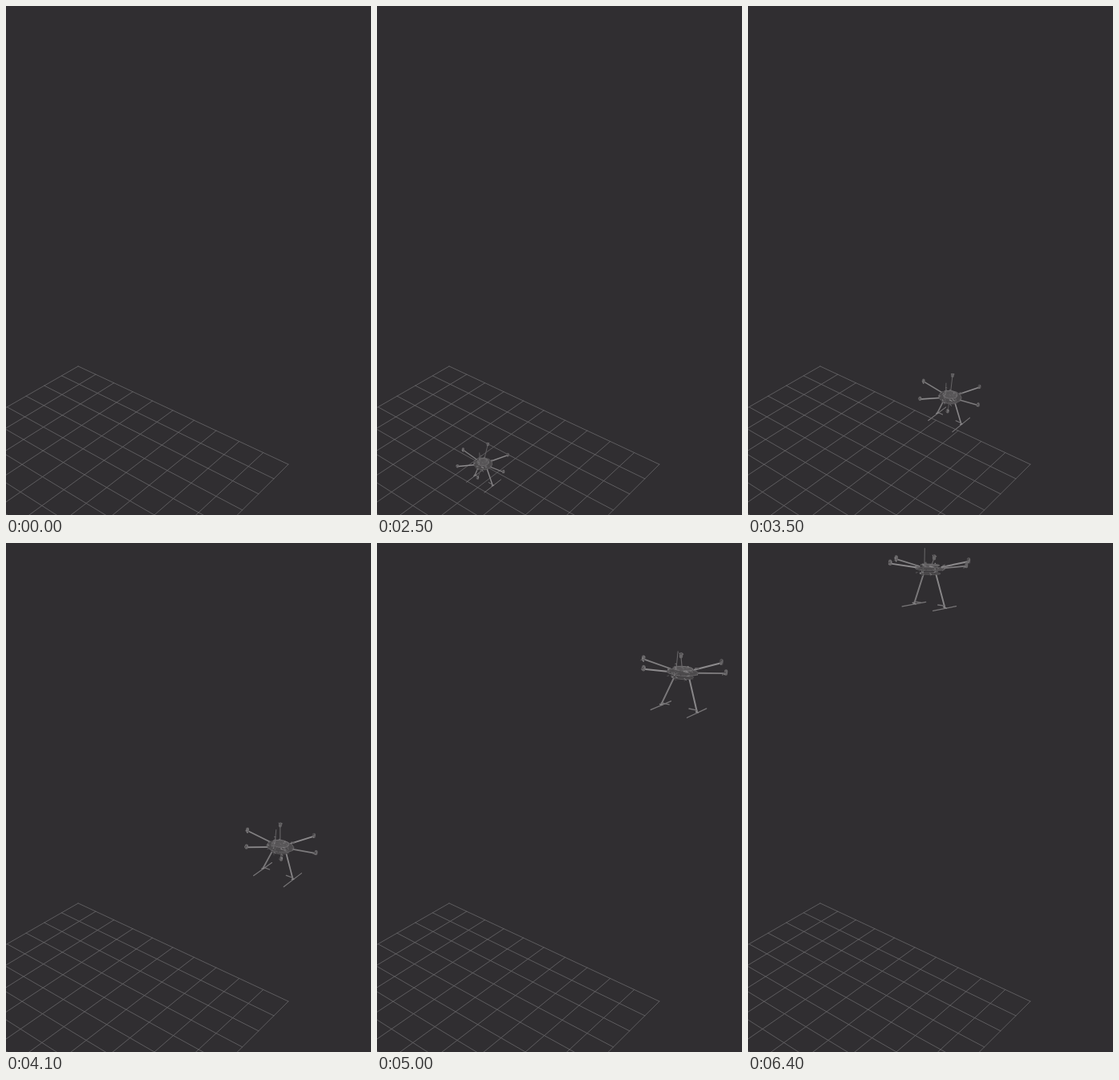
An HTML page for the animation above (7.05 s loop, 455 by 633 pixels).

```html
<!DOCTYPE html>
<html lang="en">
<head>
<meta charset="utf-8">
<title>Hexacopter take-off</title>
<style>
html, body { margin: 0; width: 100%; height: 100%; overflow: hidden; background: #302e31; }
svg { display: block; width: 455px; height: 633px; }
</style>
</head>
<body>
<svg viewBox="0 0 455 633" fill="none" stroke-linecap="round" stroke-linejoin="round">
  <path id="grid" stroke="#69676a" stroke-width=".8"/>
  <g id="drone"></g>
</svg>
<script>
const LOOP = 7050, START = 1350, STEP = 50, RADIUS = 0.85;
const drone = document.getElementById('drone');

// Fixed camera: u and v run along the floor in cells, z points up
const depth = (u, v, z) => 1 - 0.01806 * u - 0.0222 * v - 0.0158 * z;
function project(u, v, z) {
  const w = depth(u, v, z);
  const x = (90 + 19.84 * u - 22.2 * v - 3 * z) / w;
  const y = (448 + 1.906 * u + 1.6 * v - 31.9 * z) / w;
  return x.toFixed(2) + ',' + y.toFixed(2);
}

let floor = '';
for (let i = 0; i <= 10; i++) {
  floor += `M${project(i, 0, 0)}L${project(i, 10, 0)}M${project(0, i, 0)}L${project(10, i, 0)}`;
}
document.getElementById('grid').setAttribute('d', floor);

// Flight in a nearly upright plane: time, u, z
const flight = [
  [1350, 5.06, 0.14], [2500, 6.355, 1.386], [3500, 10.05, 5.732], [4100, 11.974, 9.018],
  [5000, 12.409, 12.971], [5600, 10.97, 14.274], [5800, 10.39, 14.464], [6400, 9.577, 14.576]
];

function slope(i, c) {
  if (i === 0 || i === flight.length - 1) return 0;
  const [p, k, n] = flight.slice(i - 1, i + 2);
  const h0 = k[0] - p[0], h1 = n[0] - k[0];
  return ((k[c] - p[c]) / h0 * h1 + (n[c] - k[c]) / h1 * h0) / (h0 + h1);
}

// Smooth curve through the flight points
function along(t, c) {
  const last = flight.length - 1;
  if (t >= flight[last][0]) return flight[last][c];
  let i = 0;
  while (t >= flight[i + 1][0]) i++;
  const a = flight[i], b = flight[i + 1], h = b[0] - a[0], s = (t - a[0]) / h, q = 1 - s;
  return a[c] * (1 + 2 * s) * q * q + b[c] * s * s * (3 - 2 * s) +
    h * s * q * (slope(i, c) * q - slope(i + 1, c) * s);
}

let seed = 11;
function rnd() {
  seed = (seed * 16807) % 2147483647;
  return seed / 2147483647;
}
function gray(g) {
  return `rgb(${g},${g - 2},${g})`;
}

// Model points in rotor radii: polar in the rotor plane, drop downwards
function pt(r, deg, drop) {
  const a = deg * Math.PI / 180;
  return [r * Math.cos(a), -r * Math.sin(a), drop];
}
function shift([x, y, z], r, deg, drop = 0) {
  const d = pt(r, deg, drop);
  return [x + d[0], y + d[1], z + drop];
}

const parts = [];
function add(pts, g, width, fill) {
  const el = document.createElementNS('http://www.w3.org/2000/svg', 'path');
  el.setAttribute('stroke', gray(g));
  if (fill) el.setAttribute('fill', gray(fill));
  drone.appendChild(el);
  parts.push({ el, pts, width, end: fill ? 'Z' : '' });
}

// Short random strokes that read as machine parts
function addClutter(count, center, spread, height, length) {
  for (let i = 0; i < count; i++) {
    const p = shift(center, spread * Math.sqrt(rnd()), 360 * rnd(), height * (rnd() - 0.5));
    add([p, shift(p, length * rnd(), 360 * rnd(), 0.03 * rnd())],
      Math.round(62 + 76 * rnd()), 0.8 + 0.9 * rnd());
  }
}

function addArm(deg, g, width) {
  const m = pt(1, deg, 0);
  add([pt(0.3, deg, 0.13), pt(0.95, deg, 0.03)], g, width);
  add([shift(m, 0, 0, -0.025), shift(m, 0, 0, 0.03)], 102, 4.4);
  addClutter(5, m, 0.05, 0.1, 0.05);
}

function addPlate(r, drop, edge, fill) {
  const rim = [];
  for (let a = 0; a < 360; a += 30) rim.push(pt(r, a, drop));
  add(rim, edge, 1, fill);
}

function addLeg(deg, g) {
  const foot = pt(0.45, deg, 1);
  add([pt(0.18, deg, 0.28), shift(foot, 0, 0, -0.02)], g, 2);
  add([shift(foot, 0.48, 90), shift(foot, 0.48, 270)], 120, 1.3);
  add([shift(foot, 0, 0, -0.06), shift(foot, 0.2, deg + 180, -0.06)], 118, 1.4);
  add([shift(foot, 0.06, 90), shift(foot, 0.06, 270, -0.04)], 134, 1.6);
}

addArm(120, 104, 1.2);
addArm(180, 130, 1.8);
addArm(60, 140, 2);
addLeg(180, 122);
addLeg(0, 136);
addArm(300, 86, 1.4);
addPlate(0.25, 0.26, 88, 70);
addArm(240, 142, 2);
addArm(0, 124, 1.8);
addPlate(0.35, 0.16, 104, 76);
addPlate(0.22, 0.08, 118, 88);
addClutter(50, pt(0, 0, 0.16), 0.36, 0.24, 0.09);
add([pt(0.16, 180, -0.27), pt(0.16, 180, 0.12)], 114, 0.9);

function render(ms) {
  const t = Math.floor((ms % LOOP) / STEP) * STEP;
  drone.style.display = t < START ? 'none' : '';
  if (t < START) return;
  const u = along(t, 1), z = along(t, 2), v = 5 + 0.06 * z;
  const scale = 0.3 + 0.31 / depth(u, v, z);
  for (const { el, pts, width, end } of parts) {
    const d = pts.map(p => project(u + p[0] * RADIUS, v + p[1] * RADIUS, z - p[2] * RADIUS));
    el.setAttribute('d', 'M' + d.join('L') + end);
    el.setAttribute('stroke-width', (width * scale).toFixed(2));
  }
}

const begin = performance.now();
function tick() {
  render(performance.now() - begin);
  requestAnimationFrame(tick);
}
tick();
</script>
</body>
</html>
```
